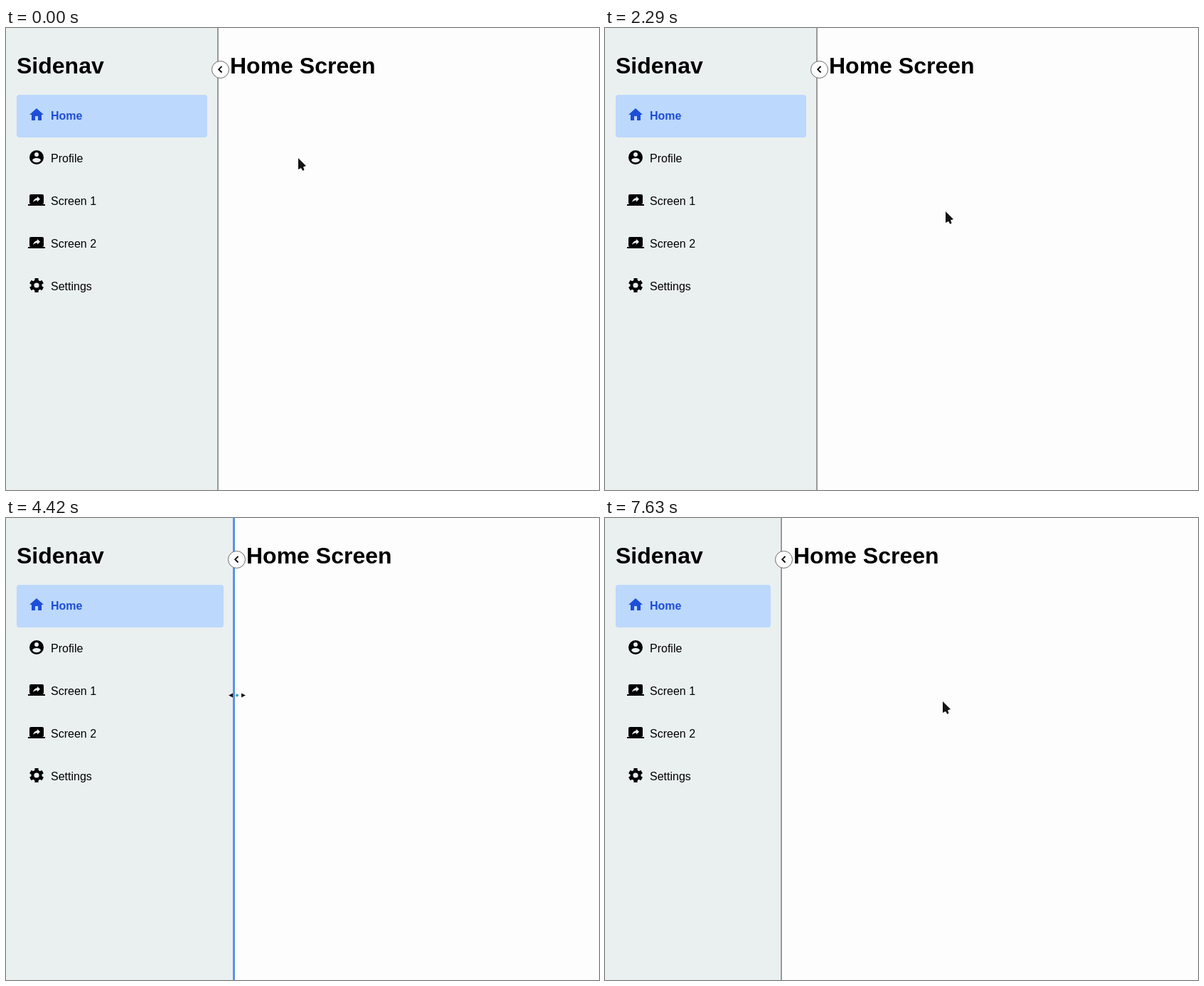
Animation of 834x650 px, one loop 7.75 s. Source, as an HTML page:

```html
<!DOCTYPE html>
<html lang="en">
<head>
<meta charset="utf-8">
<title>Sidenav</title>
<style>
  html, body { margin: 0; width: 100%; height: 100%; overflow: hidden; background: #fdfdfd; }
  body { position: relative; font: 16px "Liberation Sans", Arial, sans-serif; color: #000; cursor: default; }
  body * { box-sizing: border-box; }
  #side, #divider, #clip, #title, #toggle, #cursor { position: absolute; top: 0; left: 0; }
  #side, #divider, #clip { height: 100%; }
  #side { background: #eaf0f0; }
  #clip { overflow: hidden; }
  #content { position: absolute; inset: 0; white-space: nowrap; }
  h1 { position: absolute; top: 35px; margin: 0; font-size: 32px; line-height: 36px; white-space: nowrap; }
  #content h1 { left: 15px; }
  .item { position: absolute; left: 15px; right: 0; height: 60px; line-height: 59px; padding-left: 48px; border-radius: 4px; overflow: hidden; }
  .item svg { position: absolute; left: 16px; top: 16px; fill: currentColor; }
  .hover { background: #d8eef9; }
  .active { background: #bcd8fc; color: #1d4ed8; font-weight: bold; }
  #title { top: 35px; }
  #toggle, #cursor { overflow: visible; }
</style>
</head>
<body>
<div id="side"></div>
<div id="clip"><div id="content"><h1>Sidenav</h1></div></div>
<div id="divider"></div>
<h1 id="title">Home Screen</h1>
<svg id="toggle" width="1" height="1">
  <circle r="12" fill="#fdfdfd" stroke="#6b6b6b"/>
  <path id="chevron" d="M2 -4.5L-2.3 -.3L2 4" fill="none" stroke="#000" stroke-width="1.8"/>
</svg>
<svg id="cursor" width="1" height="1" fill="#141414">
  <path id="arrow" d="M0 0L11 11L7 12.5L8.5 16.5L6.5 18L4 14L0 16Z"/>
  <path id="hand" d="M-1.5 0Q0 -1.5 1.5 0V6L10 8.5Q12 9 11.5 12L10 17H1L-4.5 11Q-5 8.5 -3 9L-1.5 10.5Z"/>
  <path id="beam" d="M-2 -7.5H2M-2 7.5H2M0 -7V7" stroke="#141414" stroke-width="1.3"/>
  <g id="resize"><path d="M-12 .5L-6 -2.5V3.5ZM12 .5L6 -2.5V3.5Z"/><circle cy=".5" r="2" fill="#35a5b8"/></g>
</svg>
<script>
const $ = id => document.getElementById(id);
const LOOP = 7750, ROW = 60, FIRST = 94;

const screenIcon = '<path d="M20 18q2 0 2-2V6q0-2-2-2H4q-2 0-2 2v10q0 2 2 2H0v2h24v-2zM13 14.5v-2.2q-4 0-6 2.7 1-5 6-5.9V7l4 3.7z"/>';
const tooth = (_, i) => `<rect x="9.4" y="2" width="5.2" height="4.5" rx=".6" transform="rotate(${i * 60} 12 12)"/>`;
const gearIcon = '<circle cx="12" cy="12" r="5.6" fill="none" stroke="currentColor" stroke-width="4"/>'
  + Array.from({ length: 6 }, tooth).join('');
const menu = {
  'Home': '<path d="M10 20v-6h4v6h5v-8h3L12 3 2 12h3v8z"/>',
  'Profile': '<path fill-rule="evenodd" d="M12 2a10 10 0 1 0 0 20a10 10 0 1 0 0-20zM12 5a3 3 0 1 1 0 6a3 3 0 1 1 0-6zM12 19.2q-4 0-6-3.2 1-3 6-3.1 5 .1 6 3.1-2 3.2-6 3.2z"/>',
  'Screen 1': screenIcon,
  'Screen 2': screenIcon,
  'Settings': gearIcon
};
const items = Object.entries(menu).map(([label, icon], i) => {
  const el = document.createElement('div');
  el.style.top = FIRST + i * ROW + 'px';
  el.innerHTML = `<svg width="24" height="24">${icon}</svg>${label}`;
  $('content').append(el);
  return el;
});

// What the user does, and where the pointer rests: time, x, y
const COLLAPSE = [900, 6280], EXPAND = [1540, 6714], DRAG = [3000, 4600];
const SLIDE = 600;
const stops = [
  [0, 411, 183], [900, 301, 59], [1420, 208, 66], [1540, 39, 58], [2300, 479, 258],
  [3000, 302, 232], [3880, 725, 244], [4600, 252, 250], [4900, 450, 120],
  [5150, 180, 110], [5560, 171, 361], [5700, 171, 361], [6280, 252, 59],
  [6700, 39, 58], [6790, 205, 113], [7630, 475, 258]
];

const clamp = v => Math.min(1, Math.max(0, v));
const smooth = p => p * p * (3 - 2 * p);

function pointer(t) {
  const i = stops.findIndex(s => s[0] > t);
  if (i < 0) return stops.at(-1).slice(1);
  const [t0, x0, y0] = stops[i - 1], [t1, x1, y1] = stops[i];
  const p = smooth((t - t0) / (t1 - t0));
  return [x0 + (x1 - x0) * p, y0 + (y1 - y0) * p];
}

// The CSS "ease" curve, cubic-bezier(.25, .1, .25, 1)
function ease(x) {
  let lo = 0, hi = 1;
  for (let i = 0; i < 24; i++) {
    const s = (lo + hi) / 2;
    if (.75 * s * (1 - s) + s ** 3 < x) lo = s; else hi = s;
  }
  return .3 * lo * (1 - lo) ** 2 + 3 * lo * lo * (1 - lo) + lo ** 3;
}

function sideWidth(t, x) {
  if (COLLAPSE.some((from, i) => t >= from && t < EXPAND[i])) return 35;
  if (t < DRAG[0]) return 298;
  return t < DRAG[1] ? Math.round(x) - 4 : 248;
}

function slide(t, w) {
  const start = EXPAND.find(s => t >= s && t < s + SLIDE);
  return start === undefined ? 0 : -w * (1 - ease((t - start) / SLIDE));
}

function draw(t) {
  const [x, y] = pointer(t);
  const w = sideWidth(t, x);
  const shift = slide(t, w);
  const glow = clamp((t - DRAG[0] + 80) / 200) * clamp((DRAG[1] + 100 - t) / 100);
  const mix = (a, b) => Math.round(a + (b - a) * glow);

  $('side').style.width = w + 'px';
  $('clip').style.width = w - 15 + 'px';
  $('content').style.transform = `translateX(${shift}px)`;
  $('title').style.left = w + 17 + 'px';
  $('toggle').style.transform = `translate(${w + 3.5}px, 58.5px)`;
  $('chevron').setAttribute('transform', w === 35 ? 'scale(-1 1)' : '');
  Object.assign($('divider').style, {
    left: w - (glow ? 2 : 1) + 'px',
    width: (glow ? 3 : 2) + 'px',
    background: `rgb(${mix(154, 91)},${mix(154, 147)},${mix(154, 230)})`
  });

  const inRow = x > 15 + shift && x < w - 15 + shift;
  const row = inRow ? Math.floor((y - FIRST) / ROW) : -1;
  items.forEach((el, i) => {
    el.className = 'item' + (i === 0 ? ' active' : i === row ? ' hover' : '');
  });

  const dragging = t >= DRAG[0] && t < DRAG[1];
  const onToggle = Math.hypot(x - w - 3.5, y - 58.5) < 13;
  const onTitle = x > w + 17 && x < w + 221 && y > 35 && y < 71;
  const kind = dragging ? 'resize'
    : onToggle || items[row] ? 'hand'
    : Math.abs(x - w - 3) < 5 ? 'resize'
    : onTitle ? 'beam' : 'arrow';
  for (const el of $('cursor').children)
    el.style.display = el.id === kind ? '' : 'none';
  $('cursor').style.transform = `translate(${Math.round(x)}px, ${Math.round(y)}px)`;
}

const begin = performance.now();
function frame() {
  draw((performance.now() - begin) % LOOP);
  requestAnimationFrame(frame);
}
frame();
</script>
</body>
</html>
```
